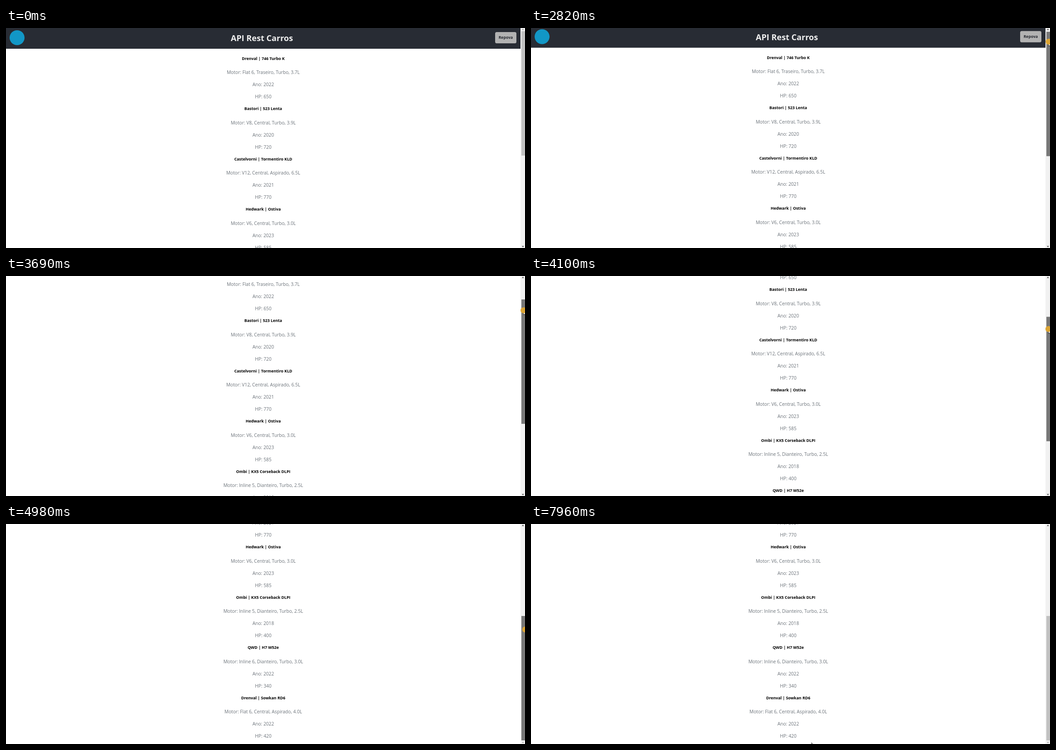
Animation, 1147 px wide and 488 px high, one loop 8 s. Source, as an HTML page:

```html
<!DOCTYPE html>
<html lang="pt">
<head>
<meta charset="utf-8">
<title>API Rest Carros</title>
<style>
html, body { margin: 0; width: 100%; height: 100%; overflow: hidden; background: #fff; }
#stage { position: relative; width: 1147px; height: 488px; overflow: hidden; font-family: "Open Sans", "Noto Sans", sans-serif; }
#page { position: absolute; left: 0; top: 0; width: 1137px; height: 840px; }
header { position: absolute; left: 0; top: 0; width: 100%; height: 46px; background: #282c34; }
.logo { position: absolute; left: 7.5px; top: 5px; width: 33px; height: 33px; border-radius: 50%; background: #1297c6; }
h1 { position: absolute; left: 0; top: 0; width: 1131px; margin: 0; text-align: center; color: #eee; font: 700 18.1px/45px "Open Sans", "Noto Sans", sans-serif; }
.button { position: absolute; left: 1081px; top: 9px; width: 47px; height: 25px; border-radius: 3.5px; background: #b2b2b2; color: #24272e; text-align: center; font-size: 8.5px; font-weight: 700; line-height: 24px; letter-spacing: .1px; }
.line { position: absolute; left: 0; width: 100%; height: 14px; text-align: center; white-space: nowrap; color: #6c737a; font-size: 10.2px; line-height: 14px; }
.line span { display: inline-block; }
.line.name { height: 13px; color: #000; font-size: 8.8px; font-weight: 700; line-height: 13px; }
.line.on span { background: #3390ff; color: #fff; box-shadow: 2px 0 #3390ff; }
#bar { position: absolute; left: 1137px; top: 0; width: 10px; height: 488px; background: #f1f1f1; }
#thumb { position: absolute; left: 1.5px; top: 7px; width: 8px; height: 276px; }
svg { position: absolute; left: 0; top: 0; }
</style>
</head>
<body>
<div id="stage">
  <div id="page">
    <header>
      <div class="logo"></div>
      <h1>API Rest Carros</h1>
      <div class="button">Repova</div>
    </header>
  </div>
  <div id="bar"><div id="thumb"></div></div>
  <svg width="1147" height="488">
    <path id="up" d="M1140 4.5L1142.4 1.5L1144.8 4.5Z"/>
    <path id="down" d="M1140 483.5L1142.4 486.5L1144.8 483.5Z"/>
    <g id="mouse">
      <path id="arrow" d="M0 0V10.4L2.4 8.2L4.1 12L5.8 11.2L4.2 7.6H7.4Z" fill="#fff" stroke="#111" stroke-width=".8"/>
      <circle id="halo" r="6.6"/>
      <path id="beam" d="M-2.3 -5.5H-.6L0 -5L.6 -5.5H2.3M0 -5V5M-2.3 5.5H-.6L0 5L.6 5.5H2.3" fill="none" stroke="#333" stroke-width=".9"/>
    </g>
  </svg>
</div>
<script>
const LOOP = 8000, TICK = 67.3, MAX_SCROLL = 351.5, THUMB_RATIO = 0.5605;
const $ = id => document.getElementById(id);

const cars = [
  ["Drenval | 746 Turbo K", "Flat 6, Traseiro, Turbo, 3.7L", 2022, 650],
  ["Bastori | 523 Lenta", "V8, Central, Turbo, 3.9L", 2020, 720],
  ["Castelvorni | Tormentiro KLD", "V12, Central, Aspirado, 6.5L", 2021, 770],
  ["Hedwark | Ostiva", "V6, Central, Turbo, 3.0L", 2023, 585],
  ["Ombi | KX5 Corseback DLPI", "Inline 5, Dianteiro, Turbo, 2.5L", 2018, 400],
  ["QWD | H7 W52e", "Inline 6, Dianteiro, Turbo, 3.0L", 2022, 340],
  ["Drenval | Sowkan RD6", "Flat 6, Central, Aspirado, 4.0L", 2022, 420]
];

function addLine(text, middle, isName) {
  const line = document.createElement("div"), span = document.createElement("span");
  line.className = isName ? "line name" : "line";
  line.style.top = middle - (isName ? 6.5 : 7) + "px";
  span.textContent = text;
  line.append(span);
  $("page").append(line);
  return line;
}

const rows = cars.map(([name, motor, year, hp], i) => {
  const y = 68 + i * 111.5;
  return [
    addLine(name, y, true),
    addLine("Motor: " + motor, y + 30),
    addLine("Ano: " + year, y + 57),
    addLine("HP: " + hp, y + 84)
  ];
});
const lastCar = rows[rows.length - 1];

// Monotone cubic curve through [tick, value...] rows
function track(keys, col) {
  const n = keys.length;
  const secant = i => (keys[i + 1][col] - keys[i][col]) / (keys[i + 1][0] - keys[i][0]);
  const slope = keys.map((_, i) => {
    if (i === 0 || i === n - 1) return 0;
    const a = secant(i - 1), b = secant(i);
    return a * b <= 0 ? 0 : 2 * a * b / (a + b);
  });
  return t => {
    if (t >= keys[n - 1][0]) return keys[n - 1][col];
    let i = 0;
    while (t >= keys[i + 1][0]) i++;
    const w = keys[i + 1][0] - keys[i][0], u = (t - keys[i][0]) / w, v = 1 - u;
    return keys[i][col] * (1 + 2 * u) * v * v + keys[i + 1][col] * u * u * (3 - 2 * u)
      + w * u * v * (slope[i] * v - slope[i + 1] * u);
  };
}

const scrollAt = track([[0, 0], [40, 0], [49, 32.5], [61, 149], [73, MAX_SCROLL]], 1);
const path = [
  [0, 1160, 40], [19, 1160, 36], [22, 1144, 29], [26, 1144, 25], [34, 1144, 29],
  [40, 1144, 29], [49, 1144, 47], [61, 1143.5, 117.5], [74, 1147.5, 234], [78, 1147, 262],
  [86, 601, 430], [90, 516, 384], [99, 595, 455.5], [101, 598, 467],
  [113, 600, 466], [118, 620, 485]
];
const mouseX = track(path, 1), mouseY = track(path, 2);

const within = (t, from, to) => t >= from && t < to;
const show = (id, on) => $(id).setAttribute("visibility", on ? "visible" : "hidden");
const selectFrom = [91, 94, 97, 100], CLEAR = 104;

function draw(ms) {
  const t = Math.floor(ms / TICK + 0.3);
  const scroll = scrollAt(t);
  $("page").style.transform = `translateY(${-scroll}px)`;

  const thumb = $("thumb").style;
  thumb.transform = `translateY(${scroll * THUMB_RATIO}px)`;
  thumb.background = within(t, 34, 77) ? "#787878" : within(t, 22, 34) ? "#a8a8a8" : "#c1c1c1";
  $("up").setAttribute("fill", scroll > 0 ? "#505050" : "#a3a3a3");
  $("down").setAttribute("fill", scroll < MAX_SCROLL ? "#505050" : "#a3a3a3");

  lastCar.forEach((line, i) => line.classList.toggle("on", within(t, selectFrom[i], CLEAR)));

  const overText = within(t, 86, 116);
  $("mouse").setAttribute("transform", `translate(${mouseX(t)} ${mouseY(t)})`);
  $("halo").setAttribute("fill", t < 80 ? "#dba434" : "#fff45e");
  show("halo", within(t, 34, 77) || within(t, 90, 101) || within(t, 104, 106));
  show("arrow", !overText);
  show("beam", overText);
}

function loop() {
  draw(performance.now() % LOOP);
  requestAnimationFrame(loop);
}
loop();
</script>
</body>
</html>
```
